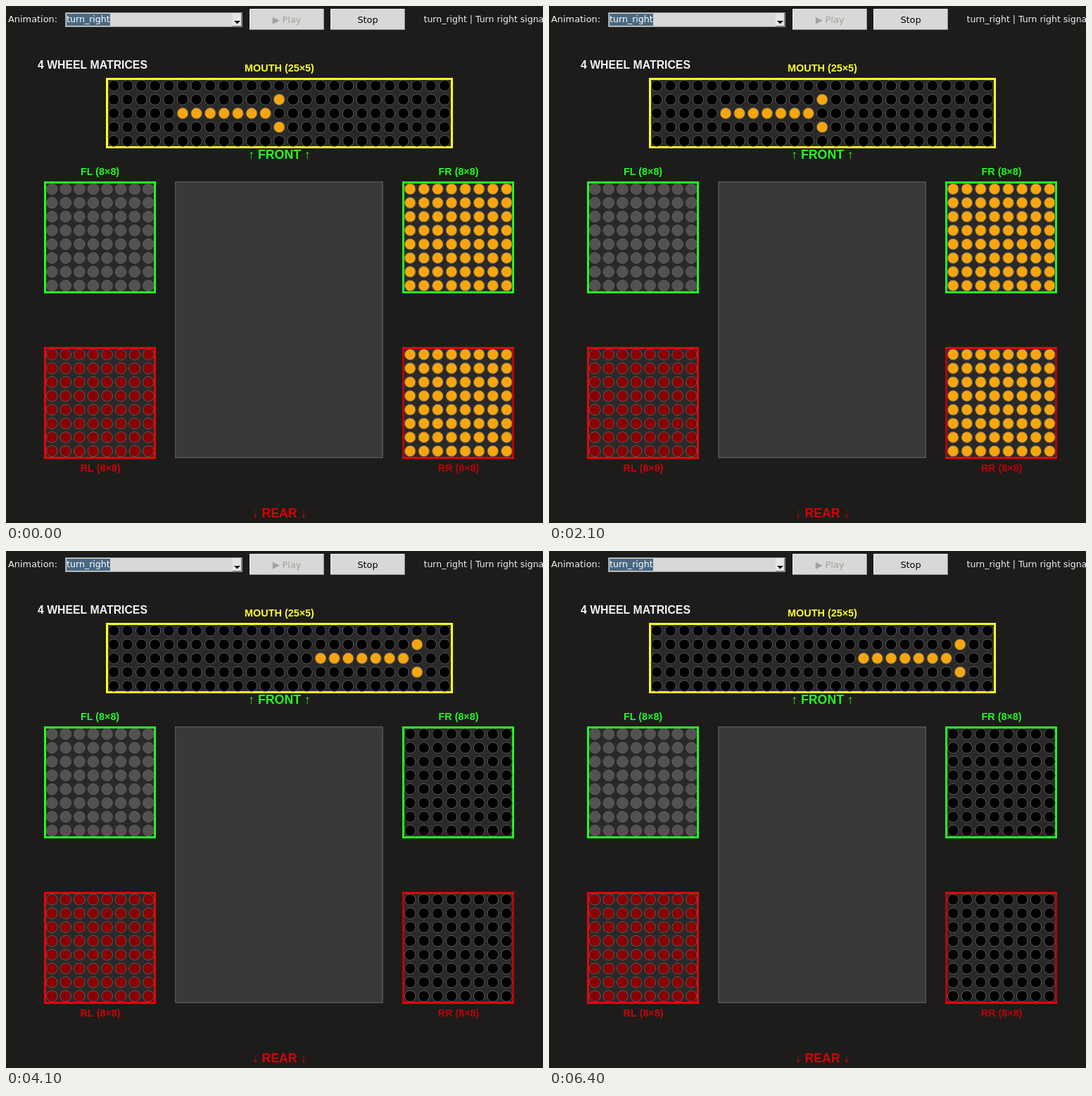
An HTML page with a canvas that plays this animation: 763 px wide and 734 px high, repeating every 6.6 s.

```html
<!DOCTYPE html>
<html lang="en">
<head>
<meta charset="utf-8">
<title>Turn right signal</title>
<style>
html, body { margin: 0; width: 763px; height: 734px; overflow: hidden; background: #1d1c1b; }
canvas { display: block; }
</style>
</head>
<body>
<canvas id="stage" width="763" height="734"></canvas>
<script>
const ctx = document.getElementById('stage').getContext('2d');
const LOOP = 6600, FRAME = 100, TICK = 252.7, LEAD = 137.7;
const PITCH = 19.59;
const ORANGE = '#f8a60c', GREEN = '#22fa22', YELLOW = '#fcfc28', RED = '#e60406', DARK_RED = '#b80406';
const UI = '"DejaVu Sans", sans-serif';
const BOLD = '"Liberation Sans", Arial, sans-serif';

function box(x, y, w, h, fill) {
  ctx.fillStyle = fill;
  ctx.fillRect(x, y, w, h);
}

function text(str, x, y, font, color, align = 'center') {
  ctx.font = font;
  ctx.fillStyle = color;
  ctx.textAlign = align;
  ctx.fillText(str, x, y);
}

const title = (str, x, y, size, color, align) =>
  text(str, x, y, `bold ${size}px ${BOLD}`, color, align);

function panel(x, y, w, h, color, side = color) {
  box(x, y, w, h, side);
  box(x, y, w, 3, color);
  box(x, y + h - 3, w, 3, color);
  box(x + 3, y + 3, w - 6, h - 6, '#2a2929');
}

// colorAt(col, row) gives the fill of each lamp
function lamps(x, y, cols, rows, colorAt) {
  ctx.lineWidth = 1;
  ctx.strokeStyle = '#5c5b5a';
  for (let r = 0; r < rows; r++) {
    for (let c = 0; c < cols; c++) {
      ctx.beginPath();
      ctx.arc(x + c * PITCH, y + r * PITCH, 7.8, 0, Math.PI * 2);
      ctx.fillStyle = colorAt(c, r);
      ctx.fill();
      ctx.stroke();
    }
  }
}

function wheel(x, y, color, lamp, side) {
  panel(x, y, 159, 159, color, side);
  lamps(x + 11.2, y + 10.8, 8, 8, () => lamp);
}

function button(x, label, color) {
  box(x, 4, 106, 30, '#8f8f8d');
  box(x, 4, 105, 29, '#f2f2f0');
  box(x + 1, 5, 104, 28, '#d8d8d6');
  text(label, x + 53, 23.5, `12.8px ${UI}`, color);
}

function toolbar() {
  text('Animation:', 3, 23, `12.9px ${UI}`, '#f0f0f0', 'left');
  box(84, 9, 252, 21, '#8f8f8d');
  box(85, 10, 250, 19, '#d8d8d6');
  box(86, 11, 62, 17, '#4a6984');
  text('turn_right', 86, 23, `12.6px ${UI}`, '#ffffff', 'left');
  box(322, 10, 13, 19, '#77777a');
  box(322, 10, 12, 18, '#e6e6e4');
  ctx.fillStyle = '#111';
  ctx.beginPath();
  ctx.moveTo(324, 21);
  ctx.lineTo(333, 21);
  ctx.lineTo(328.5, 25.5);
  ctx.fill();
  button(346, '▶ Play', '#a0a09e');
  button(461, 'Stop', '#000');
  text('turn_right | Turn right signal', 593.5, 23, `12.5px ${UI}`, '#f0f0f0', 'left');
}

function labels() {
  title('4 WHEEL MATRICES', 45, 89, 15.8, '#f4f4f4', 'left');
  title('MOUTH (25×5)', 388.5, 93, 14.4, YELLOW);
  title('↑ FRONT ↑', 388.5, 217, 17.7, GREEN);
  title('FL (8×8)', 133.5, 240, 14.3, GREEN);
  title('FR (8×8)', 643, 240, 14.3, GREEN);
  title('RL (8×8)', 134, 661, 14.3, '#c80406');
  title('RR (8×8)', 643, 661, 14.3, '#b80406');
  title('↓ REAR ↓', 388.5, 726, 17.7, '#d20406');
}

function draw(t) {
  // Ticks are shown on a 100 ms grid
  const shown = Math.floor(t / FRAME) * FRAME + FRAME - 1;
  const phase = Math.floor((shown + LEAD) / TICK) % 3;
  const head = 12 + phase * 5;
  const signal = phase < 2 ? ORANGE : '#000';
  const inArrow = (c, r) => r === 2 ? c < head && c >= head - 7 : c === head && (r === 1 || r === 3);

  box(0, 0, 763, 734, '#1d1c1b');
  toolbar();
  box(240, 249, 296, 393, '#545352');
  box(241.5, 250.5, 293, 390, '#3a3938');
  panel(142, 102, 493, 100, YELLOW);
  lamps(153.1, 113.2, 25, 5, (c, r) => inArrow(c, r) ? ORANGE : '#000');
  wheel(54, 249, GREEN, '#535152');
  wheel(563, 249, GREEN, signal);
  wheel(54, 484, RED, '#8a0002');
  wheel(563, 484, RED, signal, DARK_RED);
  labels();
}

function play() {
  draw(performance.now() % LOOP);
  requestAnimationFrame(play);
}
play();
</script>
</body>
</html>
```
